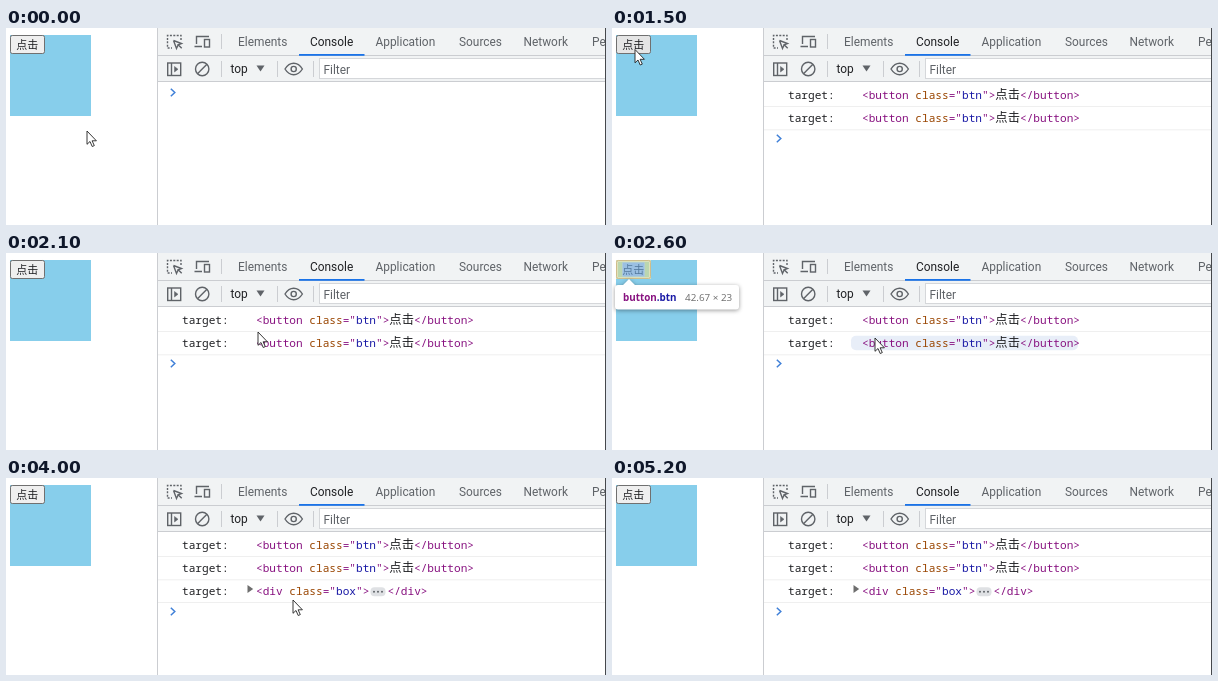
Animation of 600 by 197 pixels, one loop 5.6 s. Source, as an HTML page:

```html
<!DOCTYPE html>
<html lang="zh">
<head>
<meta charset="utf-8">
<title>Event target</title>
<style>
  html, body { margin: 0; width: 100%; height: 100%; overflow: hidden; background: #fff; }
  svg { display: block; width: 100%; height: 100%; }
  .ui { font: 11.9px Roboto, sans-serif; fill: #5f6368; }
  .ui .on { fill: #202124; }
  .code { font: 11.12px "Noto Sans Mono", monospace; fill: #202124; }
  .cjk { font-family: "Noto Sans CJK SC", "Noto Sans CJK", sans-serif; fill: #202124; }
  .tag { fill: #881280; }
  .attr { fill: #994500; }
  .val { fill: #1a1aa6; }
  .tip { font: 9.85px "Open Sans", sans-serif; fill: #6a6a6a; }
  .tip .name { font-weight: 700; }
  .icon { fill: none; stroke: #5f6368; stroke-width: 1.4; }
  .rule { fill: none; stroke: #cbcdd1; }
  .row-rule { stroke: #efefef; }
  .bubble { fill: #fff; filter: drop-shadow(0 1px 2px rgba(0, 0, 0, .4)); }
</style>
</head>
<body>
<svg viewBox="0 0 600 197">
  <rect width="600" height="197" fill="#fff"/>

  <!-- Web page -->
  <rect x="4" y="7" width="81" height="81" fill="#87ceeb"/>
  <rect id="button" x="4.5" y="7.5" width="34" height="18" rx="1.8" stroke="#707070"/>
  <text class="cjk" x="10.2" y="20.7" font-size="11">点击</text>

  <g id="buttonOverlay">
    <path d="M4 7h35v19H4zm1.6 1.6v15.8h31.8V8.600z" fill="#ffe599" fill-opacity=".66" fill-rule="evenodd"/>
    <path d="M5.600 8.600h31.8v15.8H5.600zm4.8.8v14.2h22.2V9.400z" fill="#93c47d" fill-opacity=".55" fill-rule="evenodd"/>
    <rect x="10.4" y="9.4" width="22.2" height="14.2" fill="#6fa8dc" fill-opacity=".66"/>
    <path class="bubble" d="M6 32h5l6-6 6 6h101q3 0 3 3v18.500q0 3-3 3H6q-3 0-3-3V35q0-3 3-3z"/>
    <text class="tip" y="47.5"><tspan class="name tag" x="11">button</tspan><tspan class="name val">.btn</tspan><tspan x="73">42.67 × 23</tspan></text>
  </g>
  <g id="boxOverlay">
    <rect x="4" y="7" width="81" height="81" fill="#6fa8dc" fill-opacity=".66"/>
    <path class="bubble" d="M6 94h5l6-6 6 6h83q3 0 3 3v18.500q0 3-3 3H6q-3 0-3-3V97q0-3 3-3z"/>
    <text class="tip" y="109.5"><tspan class="name tag" x="11">div</tspan><tspan class="name val">.box</tspan><tspan x="56">100 × 100</tspan></text>
  </g>

  <!-- Developer tools -->
  <rect x="152" width="448" height="53" fill="#f1f3f4"/>
  <path class="rule" d="M151.5 0V197M152 27.5H600M152 53.5H600M215.5 6V21M215.5 33V49M271.5 33V49M307.5 33V49"/>
  <rect x="313.5" y="30.5" width="290" height="20" fill="#fff" stroke="#d5d7da"/>
  <rect x="293" y="26" width="65.5" height="1.8" fill="#1a73e8"/>

  <g class="icon">
    <path d="M175 12V7.5H161.500V20H166" stroke-dasharray="2 1.4"/>
    <path d="M167.500 12.500l8 3-3.300 1.300 3.500 3.500M167.500 12.500l3 8 1.700-3.700"/>
    <path d="M190.500 16V8.500H203M188.500 18.500H196"/>
    <rect x="198.500" y="11.500" width="5" height="7.500"/>
    <rect x="161.700" y="35" width="13" height="12.500"/>
    <path d="M165.500 35V47.500"/>
    <path d="M168.500 38.500l3.500 2.750-3.500 2.750z" fill="#5f6368" stroke-width=".5"/>
    <circle cx="196.200" cy="41" r="6.700"/>
    <path d="M191.500 45.700l9.400-9.400"/>
    <path d="M279 41q3.500-5.700 8.700-5.700T296.400 41q-3.500 5.700-8.700 5.700T279 41z"/>
    <circle cx="287.700" cy="41" r="2.600"/>
  </g>
  <path d="M250.500 37.500h8l-4 6z" fill="#5f6368"/>

  <g class="ui">
    <text y="18"><tspan x="232">Elements</tspan><tspan class="on" x="304">Console</tspan><tspan x="369.500">Application</tspan><tspan x="453">Sources</tspan><tspan x="517.500">Network</tspan><tspan x="586">Pe</tspan></text>
    <text class="on" x="224.500" y="45">top</text>
    <text x="317.500" y="45.700">Filter</text>
  </g>

  <g id="rows"></g>
  <path id="prompt" d="M164.800 -3.700l4 3.700-4 3.700" fill="none" stroke="#4080d8" stroke-width="1.500"/>
  <path d="M599.500 0V197" stroke="#45484c"/>
  <path id="cursor" d="M0 0V13.300L3 10.500 5.200 15.500 7.300 14.600 5.100 9.800H9.400z" fill="#fff" stroke="#222" stroke-width=".9"/>
</svg>
<script>
const LOOP = 5600, STEP = 100;
const el = id => document.getElementById(id);
const span = (cls, text) => `<tspan class="${cls}">${text}</tspan>`;
const openTag = (tag, name) =>
  span('tag', `&lt;${tag}`) + ' ' + span('attr', 'class') + span('tag', '="') +
  span('val', name) + span('tag', '"&gt;');
const closeTag = tag => span('tag', `&lt;/${tag}&gt;`);

const buttonMarkup = `<text x="250" y="71">${openTag('button', 'btn')}` +
  `<tspan class="cjk" font-size="12.3">点击</tspan>${closeTag('button')}</text>`;
const boxMarkup = `<path d="M241.500 61l5.700 4-5.700 4z" fill="#6e6e6e"/>
  <text x="250" y="71">${openTag('div', 'box')}</text>
  <rect x="364.500" y="63.300" width="15" height="9" rx="4" fill="#dfe1e4"/>
  <path d="M368 67.800h8.100" stroke="#5f6368" stroke-width="2" stroke-linecap="round" stroke-dasharray="0 4"/>
  <text x="381.500" y="71">${closeTag('div')}</text>`;

const logs = [
  { at: 900, y: 0, width: 227, markup: buttonMarkup, hover: [[2000, 2100]] },
  { at: 1500, y: 23.3, width: 227, markup: buttonMarkup, hover: [[2200, 2700]] },
  { at: 3400, y: 46, width: 185, markup: boxMarkup, hover: [[4200, 4900]] }
];
const promptY = [64.5, 87.3, 110.5, 133.5];

// time, x, y of the pointer tip
const path = [
  [0, 81, 103], [100, 77, 95], [300, 40, 43], [500, 23, 21.500], [1500, 23, 21.500],
  [1600, 40, 27], [1800, 160, 55], [2000, 246, 72], [2100, 252, 79], [2300, 263, 85],
  [2600, 263, 85], [2700, 236, 94], [2800, 170, 98], [3000, 60, 80], [3100, 43, 72],
  [3200, 42, 69], [3300, 42, 69], [3400, 41.500, 66.500], [3500, 70, 74], [3700, 190, 105],
  [3800, 245, 118], [4000, 287, 122], [4300, 286, 112], [4800, 286, 112], [4900, 287, 119]
];

el('rows').innerHTML = logs.map(log => `<g class="code" transform="translate(0 ${log.y})">
  <rect class="hover" x="239" y="59.500" width="${log.width}" height="14.500" rx="5" fill="#e8eef8"/>
  <path class="row-rule" d="M152 78.500H599"/>
  <text x="176" y="71">target:</text>${log.markup}</g>`).join('');
logs.forEach((log, i) => {
  log.group = el('rows').children[i];
  log.highlight = log.group.querySelector('.hover');
});

const within = (t, spans) => spans.some(([from, to]) => t >= from && t < to);
const show = (node, on) => node.setAttribute('display', on ? 'inline' : 'none');

function pointerAt(t) {
  const i = path.findIndex(key => key[0] > t);
  if (i < 0) return path[path.length - 1].slice(1);
  const [t0, x0, y0] = path[i - 1], [t1, x1, y1] = path[i];
  const k = (t - t0) / (t1 - t0);
  return [x0 + (x1 - x0) * k, y0 + (y1 - y0) * k];
}

function draw() {
  const t = Math.floor(performance.now() % LOOP / STEP) * STEP;
  for (const log of logs) {
    show(log.group, t >= log.at);
    show(log.highlight, within(t, log.hover));
  }
  const count = logs.filter(log => t >= log.at).length;
  el('prompt').setAttribute('transform', `translate(0 ${promptY[count]})`);

  const pressed = within(t, [[800, 900], [1300, 1500]]);
  const hovered = within(t, [[400, 1700]]);
  el('button').setAttribute('fill', pressed ? '#f5f5f5' : hovered ? '#e5e5e5' : '#efefef');
  show(el('buttonOverlay'), within(t, [...logs[0].hover, ...logs[1].hover]));
  show(el('boxOverlay'), within(t, logs[2].hover));

  el('cursor').setAttribute('transform', `translate(${pointerAt(t)})`);
  show(el('cursor'), t < 5000);
  requestAnimationFrame(draw);
}
draw();
</script>
</body>
</html>
```
